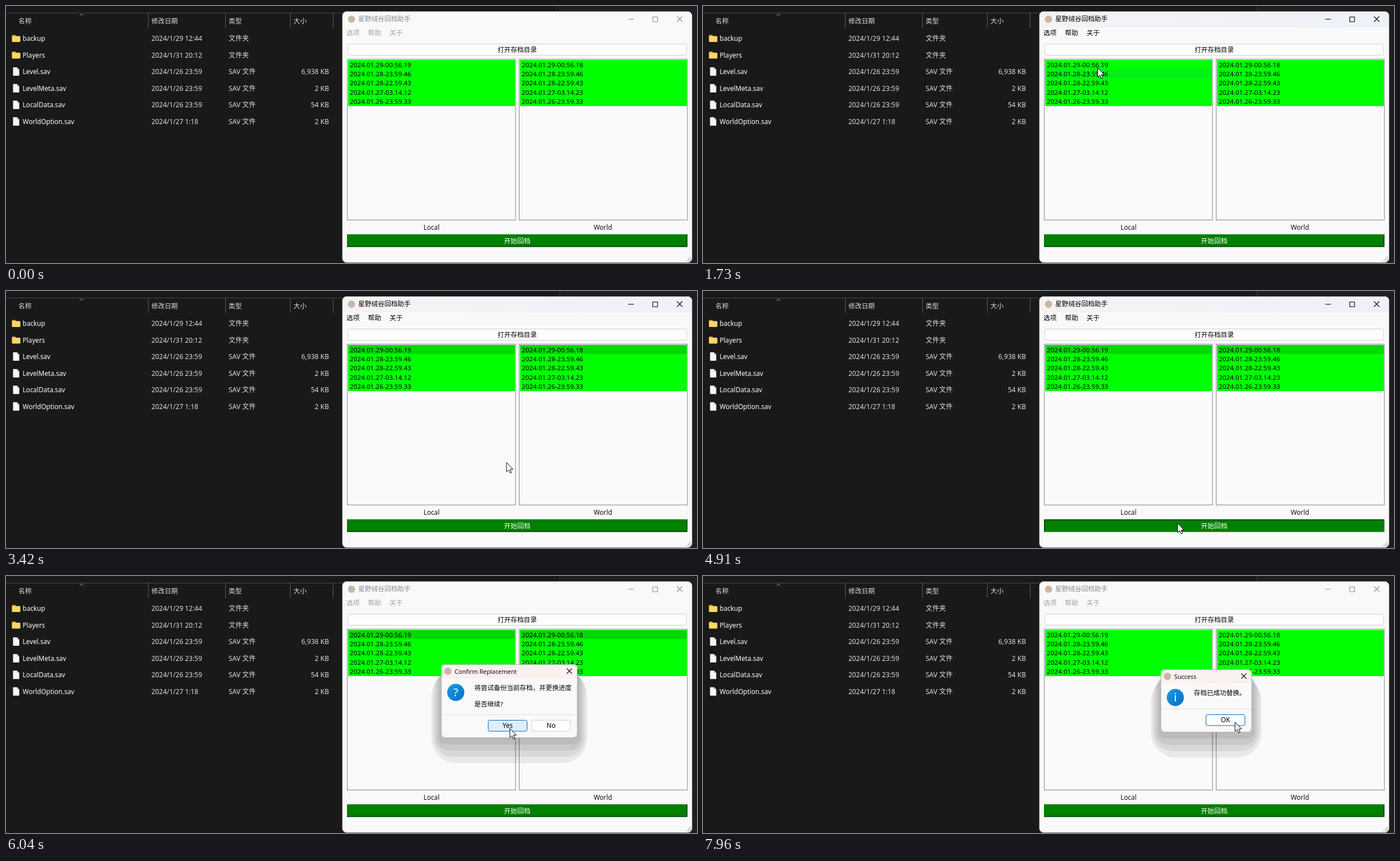
These frames come from a looping animation (1226x457 px, 8 s). An HTML page:

```html
<!DOCTYPE html>
<html lang="zh-CN">
<head>
<meta charset="utf-8">
<title>回档助手</title>
<style>
  html, body { margin: 0; width: 100%; height: 100%; overflow: hidden; background: #191919; }
  svg { display: block; width: 1226px; height: 457px; }
  text { font: 11.7px "Noto Sans", "Noto Sans CJK SC", "Noto Sans CJK", sans-serif; white-space: pre; }
</style>
</head>
<body>
<svg id="stage" viewBox="0 0 1226 457" xmlns="http://www.w3.org/2000/svg"></svg>
<script>
const LOOP = 8000, STEP = 50;
const ROW_TOP = 96, ROW_H = 16.4;
const stage = document.getElementById('stage');
const $ = id => document.getElementById(id);

const text = (x, y, s, fill, extra = '') => `<text x="${x}" y="${y}" fill="${fill}" ${extra}>${s}</text>`;
const rect = (x, y, w, h, fill, extra = '') => `<rect x="${x}" y="${y}" width="${w}" height="${h}" fill="${fill}" ${extra}/>`;
const line = (d, stroke, extra = '') => `<path d="${d}" fill="none" stroke="${stroke}" ${extra}/>`;
const size = n => `style="font-size:${n}px"`;
const mid = 'text-anchor="middle"';
const appIcon = (x, y) => `<circle cx="${x}" cy="${y}" r="6.5" fill="#cbb6a4"/>`;

// ---- File browser ----
const cols = [22, 258, 395, 510, 586];
const files = [
  ['backup', '2024/1/29 12:44'],
  ['Players', '2024/1/31 20:12'],
  ['Level.sav', '2024/1/26 23:59', '6,938 KB'],
  ['LevelMeta.sav', '2024/1/26 23:59', '2 KB'],
  ['LocalData.sav', '2024/1/26 23:59', '54 KB'],
  ['WorldOption.sav', '2024/1/27 1:18', '2 KB']
];

const folderIcon = y => rect(10.5, y - 6.5, 7, 5, '#e0a126', 'rx="1.5"') +
  rect(10.5, y - 4.5, 15, 10.5, '#ffd667', 'rx="1.5"');

const fileIcon = y => `<path d="M12.5 ${y - 8}h7l4 4v11h-11z" fill="#f6f6f6"/>` +
  `<path d="M19.5 ${y - 8}v4h4z" fill="#b9b9b9"/>`;

function browser() {
  let s = rect(0, 0, 1226, 457, '#191919') + rect(983, 0, 243, 457, '#1f1f1f') +
    line('M982.5 0V10', '#353535') + line('M0 12.5H983', '#484848') +
    line('M130.5 17.5l3.5 -3.5l3.5 3.5', '#a8a8a8');
  for (const x of cols.slice(1)) s += line(`M${x - 5.5} 13V39`, '#5c5c5c');
  ['名称', '修改日期', '类型', '大小'].forEach((h, i) => s += text(cols[i], 30.5, h, '#dedede'));
  files.forEach(([name, date, kb], i) => {
    const y = 58 + i * 29.55;
    s += (kb ? fileIcon(y) : folderIcon(y)) +
      text(29.5, y + 4, name, '#fff') +
      text(cols[1], y + 4, date, '#dedede', size(11.9)) +
      text(cols[2], y + 4, kb ? 'SAV 文件' : '文件夹', '#dedede', size(12)) +
      (kb ? text(573, y + 4, kb, '#dedede', 'text-anchor="end" ' + size(12)) : '');
  });
  return s;
}

// ---- Main window ----
const later = ['2024.01.28-23.59.46', '2024.01.28-22.59.43'];
const saves = [
  ['2024.01.29-00.56.19', ...later, '2024.01.27-03.14.12', '2024.01.26-23.59.33'],
  ['2024.01.29-00.56.18', ...later, '2024.01.27-03.14.23', '2024.01.26-23.59.33']
];
const listX = [605, 910];

function list(n) {
  const x = listX[n], w = 299;
  let s = rect(x + .5, 94.5, w - .5, 286, '#fafafa', 'stroke="#828790"');
  saves[n].forEach((label, i) => {
    const y = ROW_TOP + i * ROW_H;
    s += rect(x + 2, y, w - 3, ROW_H, '#0f0', `id="row${n}${i}" shape-rendering="crispEdges"`) +
      text(x + 5, y + 12.6, label, '#000', size(11.6));
  });
  return s;
}

function mainWindow() {
  let grip = '';
  for (let i = 0; i < 3; i++)
    for (let j = 0; j <= i; j++) grip += rect(1213 - 3 * j, 446 + 3 * i, 2, 2, '#b4b4b4');
  const controls = 'M1104 23.5h10M1147.5 19.5h8.5v8.5h-8.5zM1190.5 18.5l9.5 9.5m0 -9.5l-9.5 9.5';
  return rect(596.5, 9.5, 621, 447, '#f9f9f9', 'rx="8" stroke="#606060"') +
    '<path id="mica" d="M597 38V18q0 -8 8 -8H1209q8 0 8 8V38z" fill="url(#tint)"/>' +
    appIcon(613, 23.5) +
    `<g id="caption">${text(625, 27, '星野绒谷回档助手', 'currentColor', size(11.6))}` +
    line(controls, 'currentColor', 'stroke-width="1.1"') + '</g>' +
    `<g id="menu">${['选项', '帮助', '关于'].map((m, i) => text(604 + 38.3 * i, 52.3, m, 'currentColor')).join('')}</g>` +
    rect(606.5, 67.5, 601, 20, '#fdfdfd', 'rx="3" stroke="#d2d2d2"') +
    text(907, 82, '打开存档目录', '#000', mid + ' ' + size(11.6)) +
    list(0) + list(1) +
    text(755, 398, 'Local', '#111', mid) + text(1059, 398, 'World', '#111', mid) +
    rect(605, 406, 604, 22.5, '#008000') +
    line('M606 428V407H1208', '#004000', 'id="sunken" stroke-width="1.6"') +
    line('M605 427.5H1208.3V406', '#004000', 'id="raised" stroke-width="1.6"') +
    text(907, 421.5, '开始回档', '#fff', mid) + grip;
}

// ---- Dialogs ----
function shadow(x, y, w, h) {
  let s = '';
  for (let k = 4; k > 0; k--) {
    const side = 4.3 * k, drop = 11.2 * k;
    s += rect(x - side, y + 12, w + 2 * side, h - 12 + drop, '#000', `rx="${drop}" opacity=".07"`);
  }
  return s;
}

function button(x, y, label, main) {
  return rect(x + .5, y + .5, 69, 19.5, '#fdfdfd', `rx="3" stroke="${main ? '#0067c0' : '#d0d0d0'}" id="btn${label}"`) +
    text(x + 35, y + 14.3, label, '#000', mid);
}

function dialog(id, x, y, w, h, title, mark, lines, labels) {
  const body = rect(x, y, w, h, '#f9f9f9', 'rx="8"') +
    `<path d="M${x} ${y + 25}v-17q0 -8 8 -8h${w - 16}q8 0 8 8v17z" fill="#f8f1f0"/>` +
    line(`M${x} ${y + h - 41.5}h${w}`, '#dfdfdf') +
    rect(x + .5, y + .5, w - 1, h - 1, 'none', 'rx="8" stroke="#9a9a9a" stroke-opacity=".7"') +
    appIcon(x + 12, y + 12.5) + text(x + 24, y + 16.5, title, '#111', size(10.8)) +
    line(`M${x + w - 19} ${y + 7.5}l9 9m0 -9l-9 9`, '#111', 'stroke-width="1.1"') +
    `<circle cx="${x + 26}" cy="${y + 50}" r="15.2" fill="url(#blue)"/>` +
    text(x + 26, y + 57, mark, '#fff', mid + ' ' + size(20)) +
    lines.map((s, i) => text(x + 59, y + 46 + 28.5 * i, s, '#000', size(11.5))).join('') +
    labels.map((s, i) => button(x + w - 82 - 77 * (labels.length - 1 - i), y + h - 32, s, i === 0)).join('');
  const pivot = f => `style="transform-origin:${x + w * f}px ${y + h * f}px"`;
  return `<g id="${id}"><g clip-path="url(#pale)"><g class="shade" ${pivot(.5)}>${shadow(x, y, w, h)}</g></g>` +
    `<g class="body" ${pivot(.3)}>${body}</g></g>`;
}

stage.innerHTML = `<defs>
  <linearGradient id="tint"><stop stop-color="#f5f2f4"/><stop offset="1" stop-color="#eef1f9"/></linearGradient>
  <linearGradient id="blue" x1="0" y1="0" x2="1" y2="1"><stop stop-color="#1a9be6"/><stop offset="1" stop-color="#0670c6"/></linearGradient>
  <clipPath id="pale"><rect x="597" y="178" width="621" height="278"/></clipPath>
</defs>` + browser() + mainWindow() +
  dialog('confirm', 772, 157, 242, 131, 'Confirm Replacement', '?',
    ['将尝试备份当前存档，并更换进度', '是否继续?'], ['Yes', 'No']) +
  dialog('success', 812, 166, 162, 112, 'Success', 'i', ['存档已成功替换。'], ['OK']) +
  `<path id="arrow" d="M0 0V16.5L3.8 13L6.3 18.8L8.9 17.7L6.4 12H11.5Z" fill="#fff" stroke="#000" stroke-linejoin="round"/>
  <path id="resize" d="M0 -10.5L5 -5H1.3V5H5L0 10.5L-5 5H-1.3V-5H-5Z" fill="#fff" stroke="#000"/>`;

// ---- Motion ----
// Pointer strokes: begin, end, x, y, sideways bend
const home = [803, 464];
const strokes = [
  [320, 600, 754, 313, -.3],
  [880, 1680, 702, 124, .75],
  [1730, 1770, 699, 99, 0],
  [2100, 2660, 934, 108, .1],
  [3090, 3420, 888, 305, 0],
  [4020, 4540, 842, 413, .25],
  [5250, 5710, 887, 261, 0],
  [5860, 6040, 894, 271, 0],
  [7140, 7380, 612, 288, 0],
  [7430, 7680, 961, 280, 0],
  [7820, 7960, 944, 260, 0]
];

function bow([x0, y0], [x1, y1], bend, p) {
  const dx = x1 - x0, dy = y1 - y0, b = 2 * p * (1 - p) * bend;
  return [x0 + dx * p - dy * b, y0 + dy * p + dx * b];
}

function cursorAt(t) {
  if (t < strokes[0][0]) return null;
  let pos = home;
  for (const [t0, t1, x, y, bend] of strokes) {
    if (t < t0) break;
    const done = (Math.floor((t - t0) / STEP) + 1) * STEP / (t1 - t0 + STEP);
    pos = bow(pos, [x, y], bend, t >= t1 ? 1 : Math.min(1, done));
  }
  return pos;
}

const ramp = (t, a, b) => Math.max(0, Math.min(1, (t - a) / (b - a)));
const within = (t, a, b) => t >= a && t < b;
const show = (id, on) => $(id).style.display = on ? '' : 'none';

function pose(id, opacity, scale, shadeScale) {
  show(id, opacity > 0);
  $(id).setAttribute('opacity', opacity);
  $(id).querySelector('.body').style.transform = `scale(${scale})`;
  $(id).querySelector('.shade').style.transform = `scale(${shadeScale})`;
}

function paintRows(t) {
  const modal = within(t, 5060, 7180) || t >= 7240;
  const p = modal ? null : cursorAt(t - 45);
  const picked = [within(t, 1960, 7240), within(t, 3040, 7240)];
  const overList = p && (p[0] < 905 ? 0 : 1);
  for (let n = 0; n < 2; n++)
    for (let i = 0; i < 5; i++) {
      const hover = p && n === overList && Math.floor((p[1] - ROW_TOP) / ROW_H) === i;
      const sel = i === 0 && picked[n];
      const plain = hover ? (n ? '#00e632' : '#00f015') : '#0f0';
      $(`row${n}${i}`).setAttribute('fill', sel ? (hover ? '#00d029' : '#00d900') : plain);
    }
}

function draw(t) {
  const active = within(t, 560, 5060);
  show('mica', active);
  $('caption').style.color = active || within(t, 7060, 7240) ? '#000' : '#8c8c8c';
  $('menu').style.color = active ? '#000' : '#a0a0a0';

  const pressed = within(t, 4910, 5010);
  show('sunken', pressed);
  show('raised', !pressed);
  paintRows(t);

  const open = ramp(t, 5060, 5200), close = ramp(t, 7030, 7130);
  const grow = .92 + .08 * open;
  pose('confirm', open * (1 - close), grow - .06 * close, grow - .28 * close);
  const done = ramp(t, 7240, 7380), rise = .92 + .08 * done;
  pose('success', done, rise, rise);
  $('btnYes').setAttribute('fill', t >= 5650 ? '#e0eef9' : '#fdfdfd');

  const p = cursorAt(t), sizing = p && p[1] > 435;
  show('arrow', p && !sizing);
  show('resize', sizing);
  if (p) for (const id of ['arrow', 'resize']) $(id).setAttribute('transform', `translate(${p})`);
}

const start = performance.now();
function tick() {
  draw((performance.now() - start) % LOOP);
  requestAnimationFrame(tick);
}
tick();
</script>
</body>
</html>
```
